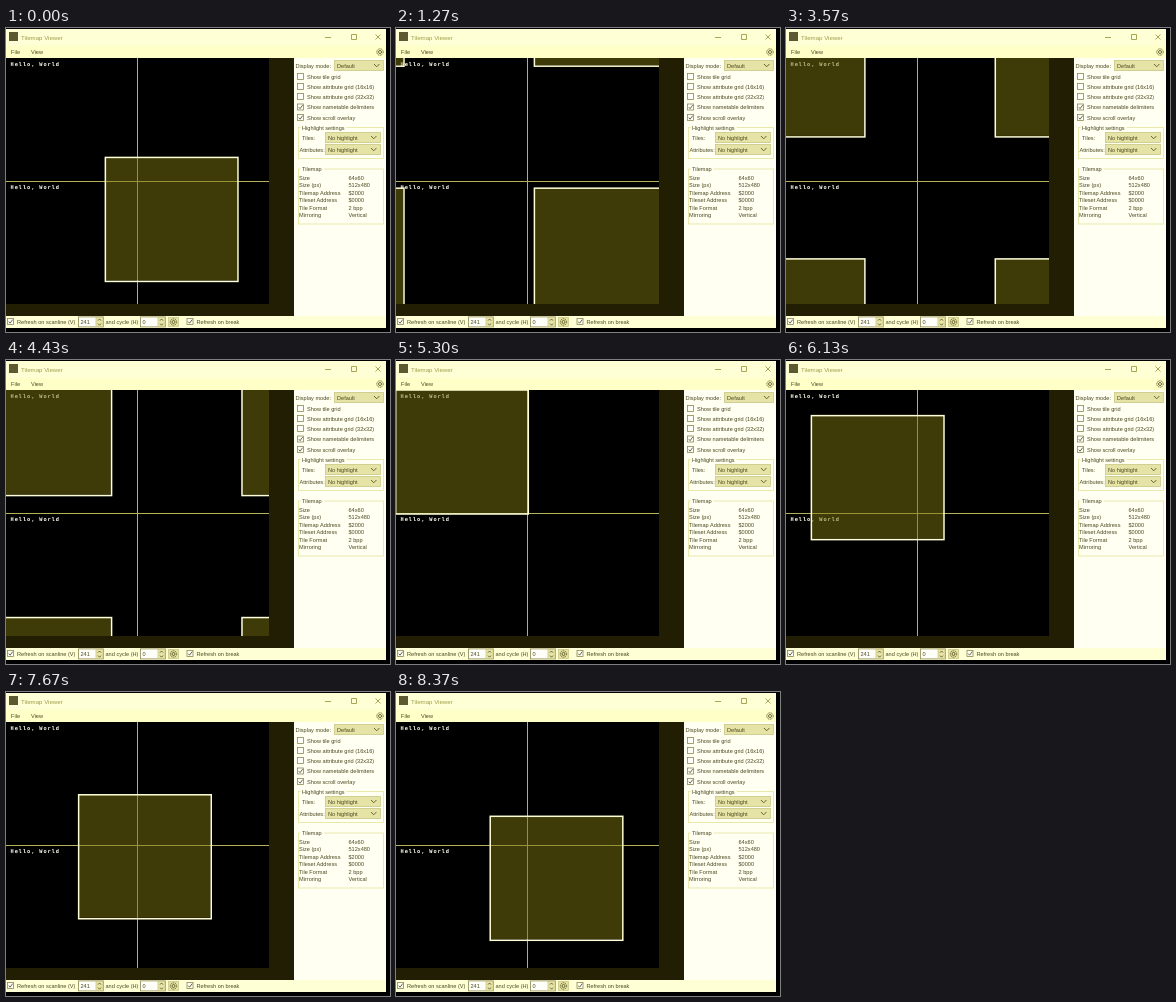
An HTML page for the animation above (8.41 s loop, 384x304 px).

```html
<!DOCTYPE html>
<html lang="en">
<head>
<meta charset="utf-8">
<title>Tilemap Viewer</title>
<style>
  html, body { margin: 0; width: 100%; height: 100%; overflow: hidden; background: #000; }
  svg { display: block; width: 384px; height: 304px; }
  text { font: 5.6px "Liberation Sans", sans-serif; fill: #4b4820; white-space: pre; }
  .title { font-size: 6.1px; fill: #a09c48; }
  .game { font: bold 5.3px "DejaVu Sans Mono", monospace; letter-spacing: .92px; fill: #fffff0; }
  .field { fill: #fffffa; stroke: #8c8850; stroke-width: .8; }
  .combo { fill: #e6e3a6; stroke: #cbc786; stroke-width: .8; }
  .line { fill: none; stroke: #5d5926; stroke-width: .9; }
  .faint { fill: none; stroke: #a09c48; stroke-width: .9; }
  .group { fill: none; stroke: #e6e39c; stroke-width: .8; }
  .panel { fill: #fffff2; }
  .bar { fill: #ffffd6; }
  .menu { fill: #ffffc8; }
</style>
</head>
<body>
<svg viewBox="0 0 384 304">
  <defs>
    <clipPath id="map"><rect y="30" width="263" height="246"/></clipPath>
    <g id="view">
      <rect width="131.5" height="123" fill="#7c7612" fill-opacity=".5"/>
      <rect x="-.3" width="132.6" height="124" fill="none" stroke="#ffffd8" stroke-width="1.5"/>
    </g>
    <g id="gear" class="line">
      <circle r="3.2" stroke-dasharray="1.3 .7"/>
      <circle r="1.5"/>
    </g>
  </defs>

  <rect class="bar" y="1" width="380" height="17"/>
  <rect class="menu" y="18" width="380" height="12"/>
  <rect y="30" width="288" height="258" fill="#211e04"/>
  <rect y="30" width="263" height="246" fill="#000"/>
  <rect class="panel" x="288" y="30" width="92" height="258"/>
  <rect class="bar" y="288" width="380" height="12"/>

  <g clip-path="url(#map)">
    <path d="M131.5 30V276M0 153.5H263" stroke="#b5b158" fill="none"/>
    <text class="game" x="4.6" y="38.2">Hello, World</text>
    <text class="game" x="4.6" y="161.4">Hello, World</text>
    <g id="scroll"></g>
  </g>

  <rect x="3" y="4" width="9" height="9" fill="#5d5a32"/>
  <path class="faint" d="M319 9.5h6M345.5 6.5h5v5h-5zM369.5 6.5l5 5m0-5l-5 5"/>
  <use href="#gear" x="374" y="24"/>
  <g id="ui"></g>
</svg>
<script>
const NS = "http://www.w3.org/2000/svg";
const ui = document.getElementById("ui");
const scroll = document.getElementById("scroll");

function add(tag, attrs, parent = ui) {
  const el = document.createElementNS(NS, tag);
  for (const key in attrs) el.setAttribute(key, attrs[key]);
  return parent.appendChild(el);
}

function label(x, y, text, cls = "") {
  add("text", { x, y, class: cls }).textContent = text;
}

function box(cls, x, y, width, height) {
  add("rect", { class: cls, x, y, width, height });
}

function stroke(d) {
  add("path", { class: "line", d });
}

function check(x, y, text, on) {
  box("field", x + .5, y + .5, 6, 6);
  if (on) stroke(`M${x + 1.7} ${y + 3.6}l1.4 1.6 2.6-3.6`);
  label(x + 10, y + 5.8, text);
}

function combo(x, y, width, text) {
  box("combo", x + .5, y + .5, width, 10);
  label(x + 3, y + 7.6, text);
  stroke(`M${x + width - 9} ${y + 4}l2.7 2.8 2.7-2.8`);
}

function group(y, height, text, width) {
  box("group", 292.5, y + .5, 85, height);
  box("panel", 294.5, y - 2, width, 5);
  label(296, y + 2.6, text);
}

function spinner(x, value) {
  box("field", x + .5, 288.9, 25, 10);
  box("combo", x + 18, 289.4, 7, 9);
  label(x + 2.5, 296, value);
  stroke(`M${x + 20} 292.6l1.5-1.6 1.5 1.6m-3 3l1.5 1.6 1.5-1.6`);
}

label(15, 11.8, "Tilemap Viewer", "title");
label(5, 26, "File");
label(25, 26, "View");

label(289.5, 39.6, "Display mode:");
combo(328, 32, 49, "Default");
check(291, 45, "Show tile grid");
check(291, 55, "Show attribute grid (16x16)");
check(291, 65, "Show attribute grid (32x32)");
check(291, 75.5, "Show nametable delimiters", true);
check(291, 86, "Show scroll overlay", true);

group(99, 31, "Highlight settings", 46);
label(296, 112, "Tiles:");
combo(319, 104, 55, "No highlight");
label(293.5, 124, "Attributes:");
combo(319, 116, 55, "No highlight");

group(140.5, 55, "Tilemap", 23);
[
  ["Size", "64x60"],
  ["Size (px)", "512x480"],
  ["Tilemap Address", "$2000"],
  ["Tileset Address", "$0000"],
  ["Tile Format", "2 bpp"],
  ["Mirroring", "Vertical"]
].forEach(([name, value], i) => {
  label(293, 151.8 + i * 7.5, name);
  label(342.5, 151.8 + i * 7.5, value);
});

check(1, 290, "Refresh on scanline (V)", true);
spinner(72, "241");
label(99.5, 296, "and cycle (H)");
spinner(134, "0");
box("combo", 162.5, 289.5, 10, 9);
add("use", { href: "#gear", x: 167.5, y: 294 });
check(180.5, 290, "Refresh on break", true);

const WIDTH = 263, HEIGHT = 246, LOOP = 8410;
const copies = [[0, 0], [1, 0], [0, 1], [1, 1]].map(([right, down]) => ({
  right, down,
  el: add("use", { href: "#view", x: -right * WIDTH, y: -down * HEIGHT }, scroll)
}));

function draw(now) {
  const t = now % LOOP, rest = t % 100;
  const step = 3 * Math.floor(t / 100) + (rest >= 30) + (rest >= 70);
  const pos = (194 + 2 * step) % 512;
  // Each 256-line vertical cycle covers only 240 visible lines.
  const line = pos < 256 ? pos : pos - 16;
  const x = pos * WIDTH / 512, y = line * HEIGHT / 480;
  scroll.setAttribute("transform", `translate(${x} ${y + 30})`);
  for (const { right, down, el } of copies) {
    const shown = (!right || pos > 256) && (!down || line > 240);
    el.setAttribute("visibility", shown ? "visible" : "hidden");
  }
}

const start = performance.now();
function tick() {
  draw(performance.now() - start);
  requestAnimationFrame(tick);
}
tick();
</script>
</body>
</html>
```
